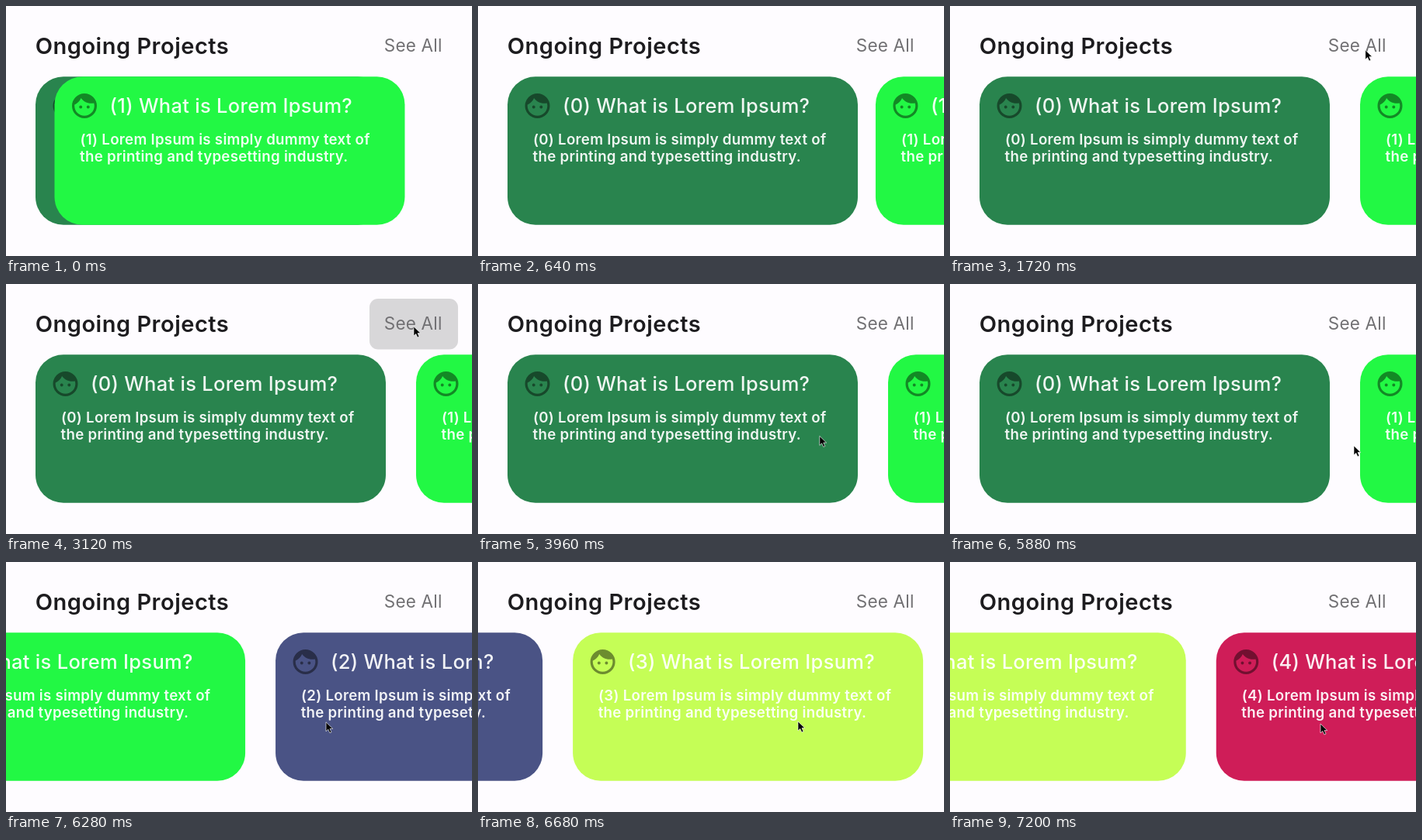
Write an HTML page that moves like this. It is 600 px wide and 323 px high and loops after 7240 ms.

```html
<!DOCTYPE html>
<html lang="en">
<head>
<meta charset="utf-8">
<title>Ongoing Projects</title>
<style>
  html, body { margin: 0; width: 100%; height: 100%; overflow: hidden; background: #fefcff; }
  svg { display: block; width: 600px; height: 323px; font-family: Inter, Roboto, sans-serif; }
  .heading { font-size: 29px; font-weight: 600; letter-spacing: .5px; fill: #1d1c1f; }
  .link { font-size: 22.5px; letter-spacing: .2px; fill: #717073; }
  .title { font-size: 25.5px; font-weight: 500; letter-spacing: .29px; fill: #fff; fill-opacity: .93; }
  .body { font-size: 18.7px; font-weight: 600; letter-spacing: .27px; fill: #fff; fill-opacity: .93; }
</style>
</head>
<body>
<svg viewBox="0 0 600 323">
  <defs>
    <clipPath id="cardClip"><rect width="451" height="191.5" rx="36"/></clipPath>
    <clipPath id="linkClip"><rect x="468" y="19" width="114" height="65.5" rx="11"/></clipPath>
    <path id="face" fill-rule="evenodd" d="M9 11.75a1.25 1.25 0 1 0 0 2.5a1.25 1.25 0 1 0 0-2.5zm6 0a1.25 1.25 0 1 0 0 2.5a1.25 1.25 0 1 0 0-2.5zM12 2a10 10 0 1 0 0 20a10 10 0 1 0 0-20zm0 18c-4.41 0-8-3.59-8-8 0-.29.02-.58.05-.86 2.36-1.05 4.23-2.98 5.21-5.37C11.07 8.33 14.05 10 17.42 10c.78 0 1.53-.09 2.25-.26.21.71.33 1.47.33 2.26 0 4.41-3.59 8-8 8z"/>
  </defs>
  <text class="heading" x="37.8" y="62">Ongoing Projects</text>
  <g clip-path="url(#linkClip)"><circle id="linkRipple" cx="525" cy="55"/></g>
  <text class="link" x="486.8" y="59">See All</text>
  <g id="cards"></g>
  <path id="cursor" d="M0 0V12L2.8 9.4L4.9 14L7 13.1L5 8.6H8.8Z" fill="#000" stroke="#fff" stroke-width=".8" stroke-opacity=".8"/>
</svg>
<script>
const LOOP = 7240, PITCH = 490;
const colors = ['#29844e', '#22f844', '#4a5385', '#c5fe56', '#cf1d58'];
const $ = id => document.getElementById(id);

$('cards').innerHTML = colors.map((color, i) => `<g>
  <rect width="451" height="191.5" rx="36" fill="${color}"/>
  ${i ? '' : '<g clip-path="url(#cardClip)"><circle id="cardRipple" cx="373" cy="133"/></g>'}
  <use href="#face" transform="translate(19.3 18.5) scale(1.6)" fill-opacity=".45"/>
  <text class="title" x="71" y="46.7">(${i}) What is Lorem Ipsum?</text>
  <text class="body" x="33" y="88.2">(${i}) Lorem Ipsum is simply dummy text of</text>
  <text class="body" x="32.6" y="110.2">the printing and typesetting industry.</text>
</g>`).join('');
const cards = [...$('cards').children];

// Pointer stops: time, x, y
const stops = [
  [1000, 556, -20], [1480, 535, 57], [2280, 534, 57], [2480, 525, 55],
  [3300, 525, 55], [3840, 452, 186], [4180, 410, 222], [5300, 410, 222],
  [5800, 520, 209], [5900, 520, 209], [6128, 412, 207], [6680, 412, 206],
  [7200, 477, 209], [7240, 477, 209]
];

const progress = (t, from, to) => Math.min(1, Math.max(0, (t - from) / (to - from)));
const smooth = p => p * p * (3 - 2 * p);

function pointer(t) {
  const n = Math.max(1, stops.findIndex(s => s[0] >= t));
  const [a, b] = [stops[n - 1], stops[n]];
  const raw = progress(t, a[0], b[0]);
  const p = b[0] === 6128 ? raw * raw : smooth(raw);
  return [a[1] + (b[1] - a[1]) * p, a[2] + (b[2] - a[2]) * p];
}

// Drag with the pointer, then a decaying fling
function scroll(t) {
  if (t < 6128) return 108 * progress(t, 5900, 6128) ** 2;
  return 108 + 1631 * (1 - Math.exp(-2.767 * (t - 6128) / 1000));
}

function ripple(circle, radius, opacity) {
  circle.setAttribute('r', radius);
  circle.setAttribute('fill-opacity', opacity);
}

function draw(t) {
  const offset = scroll(t);
  const entering = 467 * (1 - progress(t, 0, 950)) ** 3;
  cards.forEach((card, i) => {
    const x = 38 + PITCH * i - offset - (i === 1 ? entering : 0);
    card.setAttribute('transform', `translate(${x} 91.3)`);
  });
  ripple($('linkRipple'), 75 * progress(t, 2560, 2920), .15 * (1 - progress(t, 3180, 3480)));
  ripple($('cardRipple'), 410 * progress(t, 4250, 4802), .11 * (1 - progress(t, 4780, 5080)));
  $('cursor').setAttribute('transform', `translate(${pointer(t)})`);
}

const start = performance.now();
function tick() {
  draw((performance.now() - start) % LOOP);
  requestAnimationFrame(tick);
}
tick();
</script>
</body>
</html>
```
